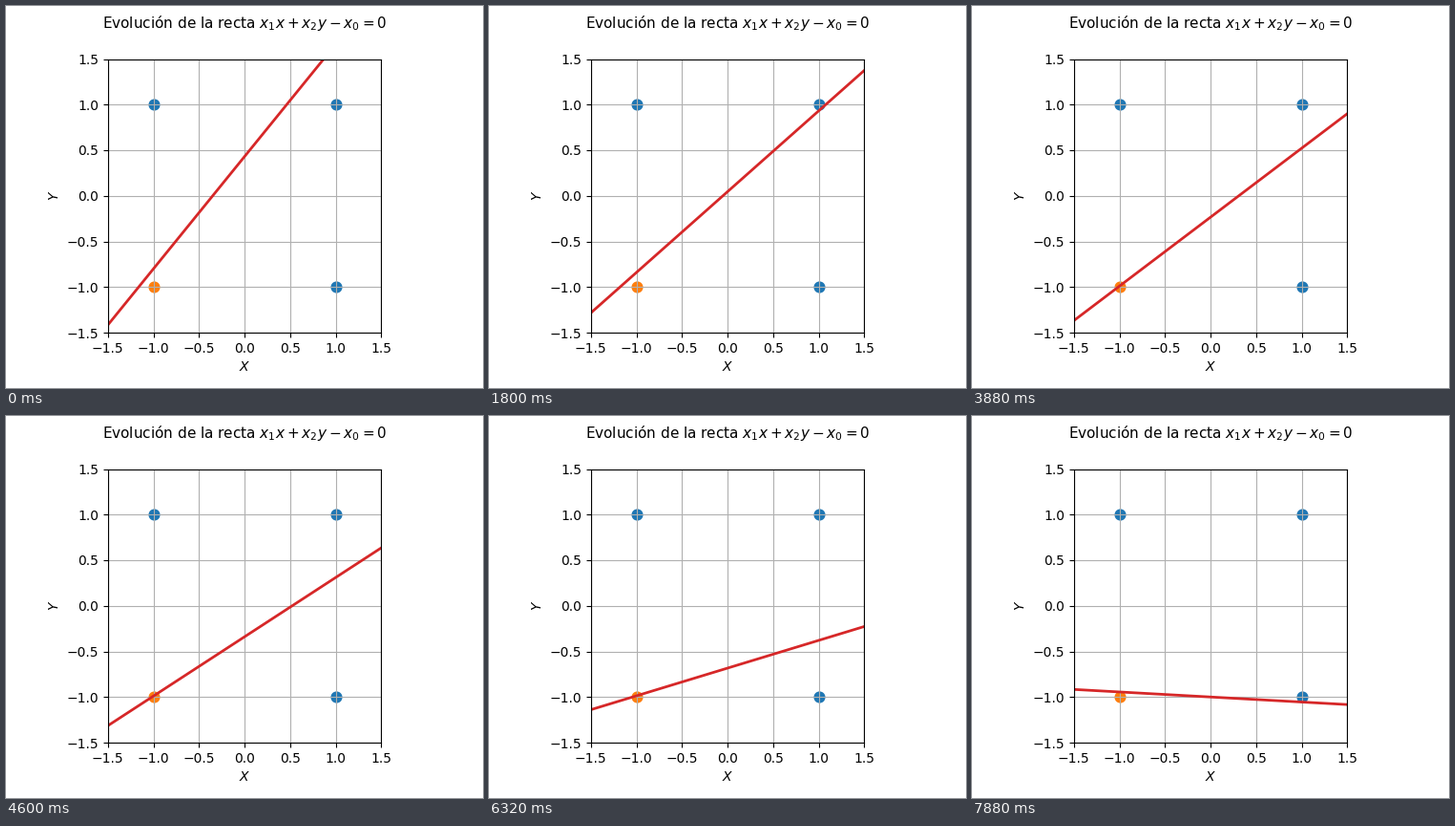
Recreate the animation shown at these times as a matplotlib script. Size 500 px wide and 400 px high, loop 8000 ms.

```python
import numpy as np
import matplotlib.pyplot as plt
from matplotlib.animation import FuncAnimation

W, H, DPI = 500, 400, 100
FRAMES, INTERVAL = 200, 40
EPOCHS = 197
LIM = 1.5
RATE, GAIN = 0.00483, 100

# Logical OR on +-1 inputs; the third input is the constant for x0
points = np.array([(-1, -1, -1), (-1, 1, -1), (1, -1, -1), (1, 1, -1)])
labels = np.array([0, 1, 1, 1])


def train(w):
    """Return the weights (x1, x2, x0) before training and after each epoch."""
    history = [w]
    for _ in range(EPOCHS):
        output = 1 / (1 + np.exp(-GAIN * points @ w))
        w = w + RATE * (labels - output) @ points
        history.append(w)
    return history


history = train(np.array([-1.231, 1.0, 0.430]))

plt.rcParams["font.family"] = "DejaVu Sans"
fig = plt.figure(figsize=(W / DPI, H / DPI), dpi=DPI)

left, bottom, side = 106.75, 58, 286.5
ax = fig.add_axes([left / W, bottom / H, side / W, side / H])
ticks = np.linspace(-LIM, LIM, 7)
ax.set(xlim=(-LIM, LIM), ylim=(-LIM, LIM), xticks=ticks, yticks=ticks,
       xlabel="$X$", ylabel="$Y$")
ax.grid(True)
fig.suptitle("Evolución de la recta $x_1x + x_2y - x_0 = 0$", fontsize=11)

for label, color in (1, "tab:blue"), (0, "tab:orange"):
    x, y, _ = points[labels == label].T
    ax.scatter(x, y, s=60, color=color)

xs = np.array([-LIM, LIM])
line, = ax.plot([], [], color="tab:red", lw=2)


def update(frame):
    x1, x2, x0 = history[min(frame, EPOCHS)]
    line.set_data(xs, (x0 - x1 * xs) / x2)
    return line,


anim = FuncAnimation(fig, update, frames=FRAMES, interval=INTERVAL,
                     repeat=True, repeat_delay=0)
plt.show()
```
